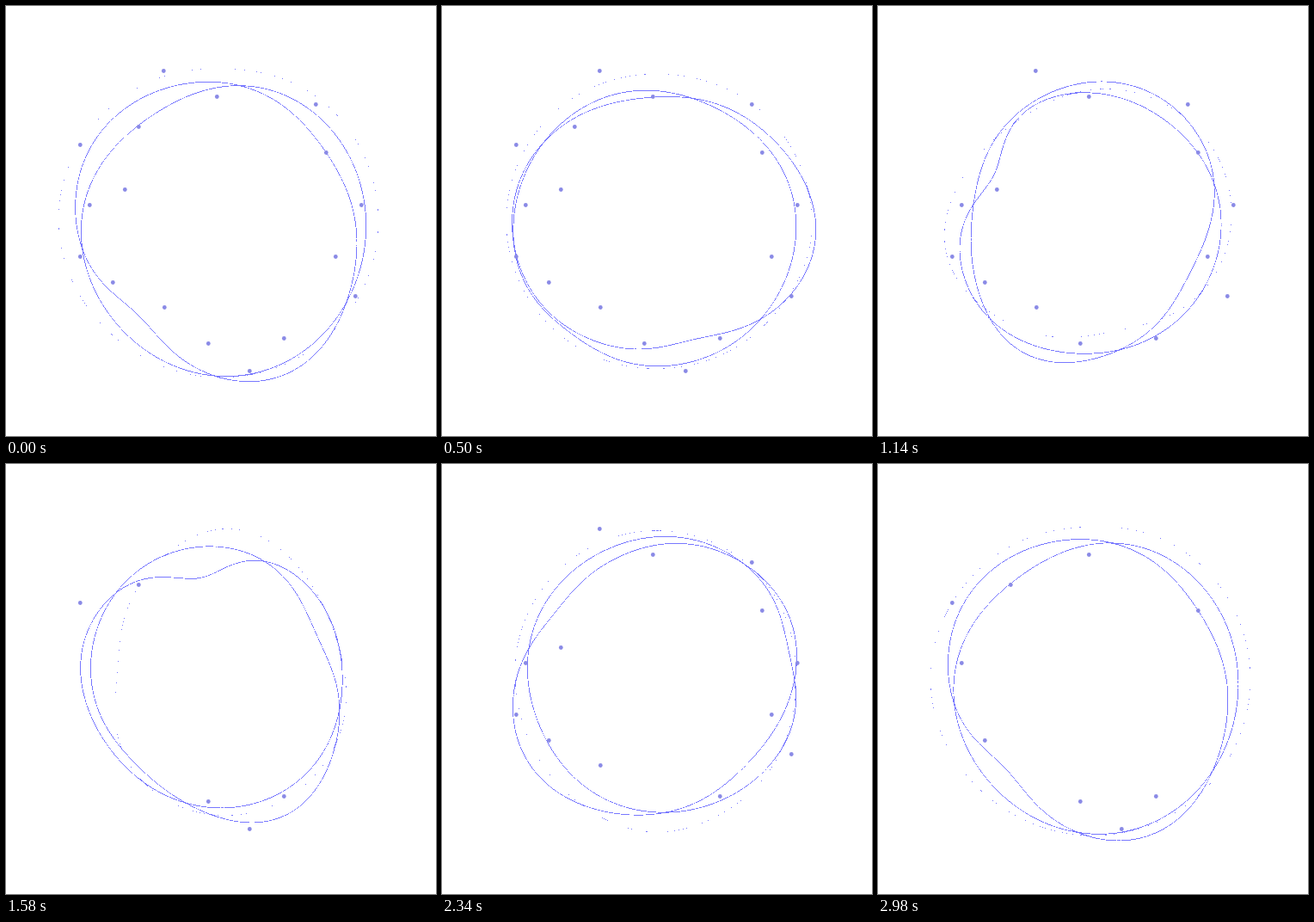
Write an HTML page with a canvas that moves like this. It is 500 by 500 pixels and loops after 3000 ms.

```html
<!DOCTYPE html>
<html>
<head>
<meta charset="utf-8">
<style>
html, body { margin: 0; width: 100%; height: 100%; overflow: hidden; background: #fff; }
canvas { display: block; }
</style>
</head>
<body>
<canvas id="stage" width="500" height="500"></canvas>
<script>
const LOOP = 3000, STEP = 20, SIZE = 500, CX = 251, CY = 250;
const ctx = document.getElementById('stage').getContext('2d', { willReadFrequently: true });

// A blob is a circle with smooth bumps and dents: [angle, height, spread], in degrees and px
const blob = (base, ...bumps) => deg => bumps.reduce((r, [at, height, spread]) => {
  const d = (deg - at + 540) % 360 - 180;
  return r + height * Math.exp(-((d / spread) ** 2) / 2);
}, base);

const dented = blob(148, [60, 11, 38], [165, -27, 26], [255, 27, 22], [325, -8, 20]);

// Each ring turns while it morphs between two blobs and back
const rings = [
  { turns: -1, alpha: 0.9, to: dented,
    from: blob(160, [68, 33, 26], [132, -16, 16], [210, 15, 32], [325, -15, 26]) },
  { turns: 1, alpha: 0.9, to: blob(150, [5, 16, 26], [68, -31, 16], [170, -10, 30]),
    from: blob(166, [80, 15, 38], [236, -19, 30]) },
  { turns: 2, alpha: 0.535, to: dented,
    from: blob(182, [185, 8, 30], [272, -5, 16]) }
];

// Dots that share a rhythm go out around `at` and every `period` from there
const BLINK_START = 600;
const rhythms = [
  { period: 1400, at: 1580, dots: [[183, 75], [360, 114], [184, 350], [138, 213],
    [383, 291], [413, 231], [86, 291], [406, 337]] },
  { period: 1200, at: 1140, dots: [[154, 140], [86, 161], [283, 424]] },
  { period: LOOP, at: 1580, dots: [[245, 105], [97, 231], [372, 170], [124, 321]] },
  { period: 1560, at: 780, dots: [[235, 392]] },
  { period: Infinity, dots: [[323, 386]] }
];

function drawRing({ turns, alpha, from, to }, p) {
  const mix = (1 - Math.cos(2 * Math.PI * p)) / 2;
  ctx.globalAlpha = alpha;
  ctx.beginPath();
  for (let deg = 0; deg < 360; deg += 1.5) {
    const r = from(deg) * (1 - mix) + to(deg) * mix;
    const angle = 2 * Math.PI * (deg / 360 + turns * p);
    ctx.lineTo(CX + r * Math.cos(angle), CY + r * Math.sin(angle));
  }
  ctx.closePath();
  ctx.stroke();
}

// Hard-edged lines: keep only pixels at least half covered
function harden() {
  const img = ctx.getImageData(0, 0, SIZE, SIZE);
  const px = new Uint32Array(img.data.buffer);
  for (let i = 0; i < px.length; i++) {
    if (px[i]) px[i] = px[i] >>> 24 > 127 ? 0xffff7878 : 0;
  }
  ctx.putImageData(img, 0, 0);
}

function isOut({ period, at }, t) {
  if (t < BLINK_START || period === Infinity) return false;
  const cycles = (t - at) / period;
  return Math.abs(cycles - Math.round(cycles)) < 1 / 8;
}

function draw(now) {
  const t = Math.floor(now % LOOP / STEP) * STEP;
  ctx.clearRect(0, 0, SIZE, SIZE);
  ctx.strokeStyle = '#7878ff';
  for (const ring of rings) drawRing(ring, t / LOOP);
  harden();
  ctx.globalAlpha = 1;
  ctx.fillStyle = '#8a8ae6';
  for (const rhythm of rhythms) {
    if (isOut(rhythm, t)) continue;
    for (const [x, y] of rhythm.dots) {
      ctx.beginPath();
      ctx.arc(x + 0.3, y + 0.5, 2.4, 0, 2 * Math.PI);
      ctx.fill();
    }
  }
}

const start = performance.now();
function tick() {
  draw(performance.now() - start);
  requestAnimationFrame(tick);
}
tick();
</script>
</body>
</html>
```
